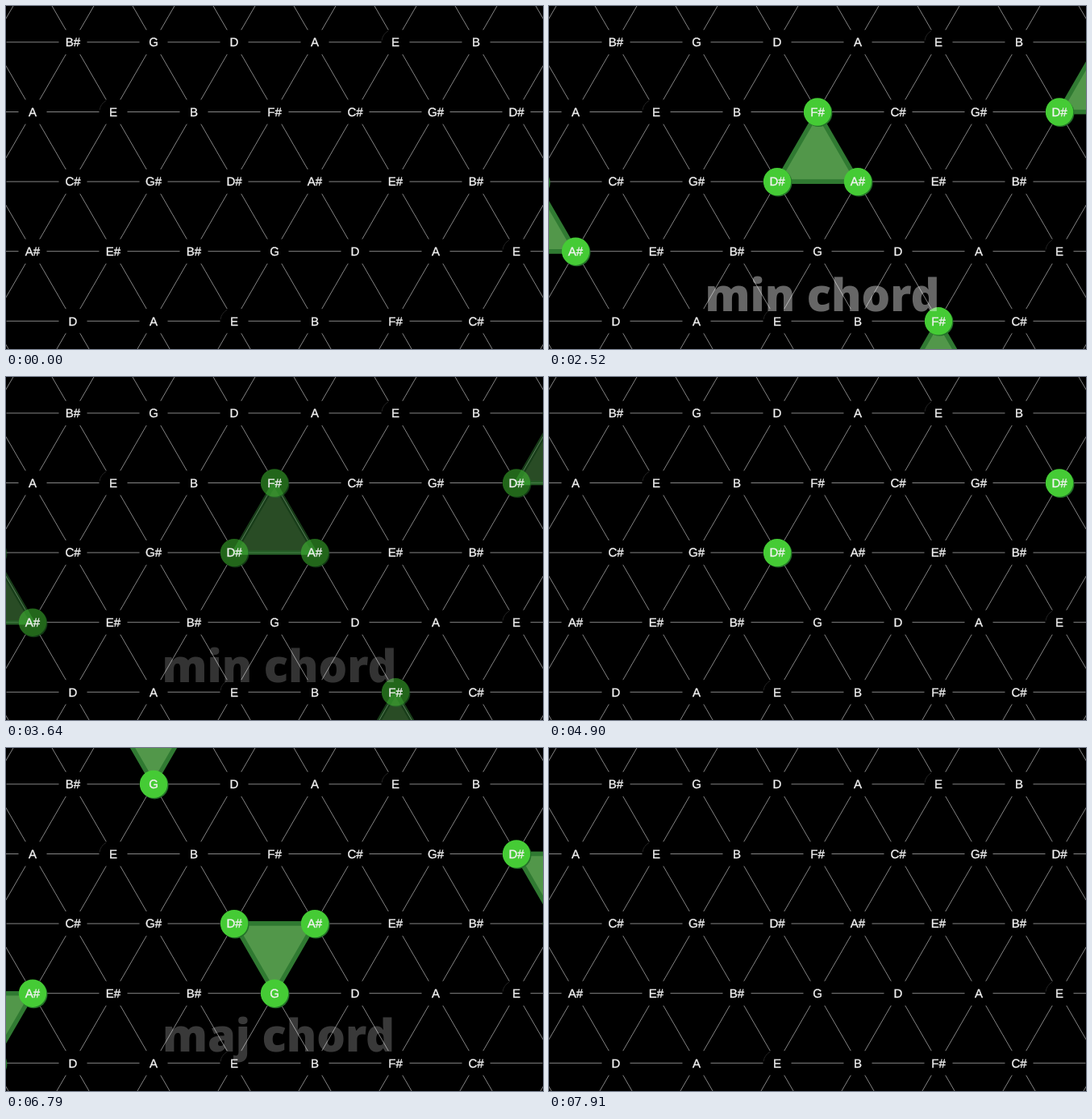
These frames come from a looping animation (666x426 px, 8.19 s). An HTML page:

```html
<!DOCTYPE html>
<html lang="en">
<head>
<meta charset="utf-8">
<title>Chords on a note lattice</title>
<style>
html, body { margin: 0; width: 100%; height: 100%; overflow: hidden; background: #000; }
svg { display: block; width: 100vw; height: 100vh; text-rendering: geometricPrecision; }
.grid { stroke: #858585; stroke-width: 1; }
.arc { fill: none; stroke: #222; stroke-width: 1; }
.label { font: 15px "Liberation Sans", Arial, sans-serif; fill: #f2f2f2; stroke: #f2f2f2; stroke-width: .35; text-anchor: middle; }
.edge { stroke: #307a32; stroke-width: 5.5; }
.face { fill: #52974a; stroke: #307a32; stroke-width: 5.5; }
.caption { font: 800 56px "Open Sans", "Noto Sans", sans-serif; fill: #fff; text-anchor: middle; }
</style>
</head>
<body>
<svg id="stage" viewBox="0 0 666 426"></svg>
<script>
const LOOP = 8190, STEP = 70;
const SIDE = 100, ROW = 86.6, TOP = 44.9, GAP = 17.5, RADIUS = 17.2;
const FIFTHS = "G D A E B F# C# G# D# A# E# B#".split(" ");
const ROW_START = [11, 2, 6, 9, 1];
// Places where the same three notes recur on the lattice
const REPEATS = [[0, 0], [350, -ROW], [-350, ROW], [150, 3 * ROW], [-150, -3 * ROW]];
const stage = document.getElementById("stage");

function add(parent, tag, attrs = {}, text = "") {
  const el = document.createElementNS("http://www.w3.org/2000/svg", tag);
  for (const key in attrs) el.setAttribute(key, attrs[key]);
  el.textContent = text;
  parent.appendChild(el);
  return el;
}

const layer = () => add(stage, "g");
const gridLayer = layer(), chordLayer = layer(), noteLayer = layer(), labelLayer = layer(), captionLayer = layer();
const rowY = row => TOP + row * ROW;
const rowX = row => row % 2 ? 33 : 83;

function gridLine(x, y, angle) {
  const c = Math.cos(angle), s = Math.sin(angle), far = SIDE - GAP;
  add(gridLayer, "line", { class: "grid", x1: x + GAP * c, y1: y + GAP * s, x2: x + far * c, y2: y + far * s });
}

function buildGrid() {
  for (let row = -1; row < 6; row++) {
    for (let col = -2; col < 8; col++) {
      const x = rowX(row) + col * SIDE, y = rowY(row);
      [0, 1, 2].forEach(k => gridLine(x, y, k * Math.PI / 3));
      const inside = row >= 0 && row < 5 && x > 0 && x < 666;
      if (!inside) continue;
      const name = FIFTHS[(ROW_START[row] + col) % 12];
      add(labelLayer, "text", { class: "label", x, y: y + 5.2 }, name);
      if (name === "E") add(gridLayer, "path", { class: "arc", d: `M${x - 17} ${y - 2}A17 17 0 0 1 ${x - 9} ${y - 14}` });
    }
  }
}

function notes(x, y) {
  const group = add(noteLayer, "g");
  for (const [dx, dy] of REPEATS) {
    add(group, "circle", { cx: x + dx + 1.3, cy: y + dy + 1.3, r: RADIUS, fill: "#247329" });
    add(group, "circle", { cx: x + dx, cy: y + dy, r: RADIUS, fill: "#45cb35" });
  }
  return group;
}

function faces(tipY) {
  const group = add(chordLayer, "g");
  for (const [dx, dy] of REPEATS) {
    const y = rowY(2) + dy;
    add(group, "path", { class: "face", d: `M${283 + dx} ${y}h100L${333 + dx} ${tipY + dy}Z` });
  }
  return group;
}

function edges() {
  const group = add(chordLayer, "g");
  for (const [dx, dy] of REPEATS) {
    const y = rowY(2) + dy;
    add(group, "line", { class: "edge", x1: 283 + dx, y1: y, x2: 383 + dx, y2: y });
  }
  return group;
}

buildGrid();
const root = notes(283, rowY(2)), fifth = notes(383, rowY(2)), bar = edges();
const caption = (text, x, y) => add(captionLayer, "text", { class: "caption", x, y }, text);

const chords = [
  { on: [630, 1540, 2240], shown: 2940, textOff: 3150, off: 3570, gone: 3780,
    third: notes(333, rowY(1)), face: faces(rowY(1)), text: caption("min chord", 339, 379) },
  { on: [4900, 5810, 6650], shown: 7280, textOff: 7700, off: 7700, gone: 7910,
    third: notes(333, rowY(3)), face: faces(rowY(3)), text: caption("maj chord", 338, 377) }
];

const ramp = (t, from, to) => Math.min(1, Math.max(0, (t - from) / (to - from)));
const show = (el, alpha) => el.setAttribute("opacity", alpha);

function draw(time) {
  const t = Math.floor(time % LOOP / STEP) * STEP;
  let rootLevel = 0, fifthLevel = 0;
  for (const c of chords) {
    const held = 1 - ramp(t, c.off - STEP, c.gone);
    const level = at => ramp(t, at - STEP, at + STEP) * held;
    if (t >= c.on[0]) {
      rootLevel = held;
      fifthLevel = level(c.on[1]);
    }
    show(c.third, level(c.on[2]));
    show(c.face, level(c.on[2]));
    show(c.text, ramp(t, c.on[2], c.shown) * (1 - ramp(t, c.textOff - STEP, c.gone)));
  }
  show(root, rootLevel);
  show(fifth, fifthLevel);
  show(bar, fifthLevel);
}

const start = performance.now();
function tick(now) {
  draw(Math.max(0, now - start));
  requestAnimationFrame(tick);
}
draw(0);
requestAnimationFrame(tick);
</script>
</body>
</html>
```
